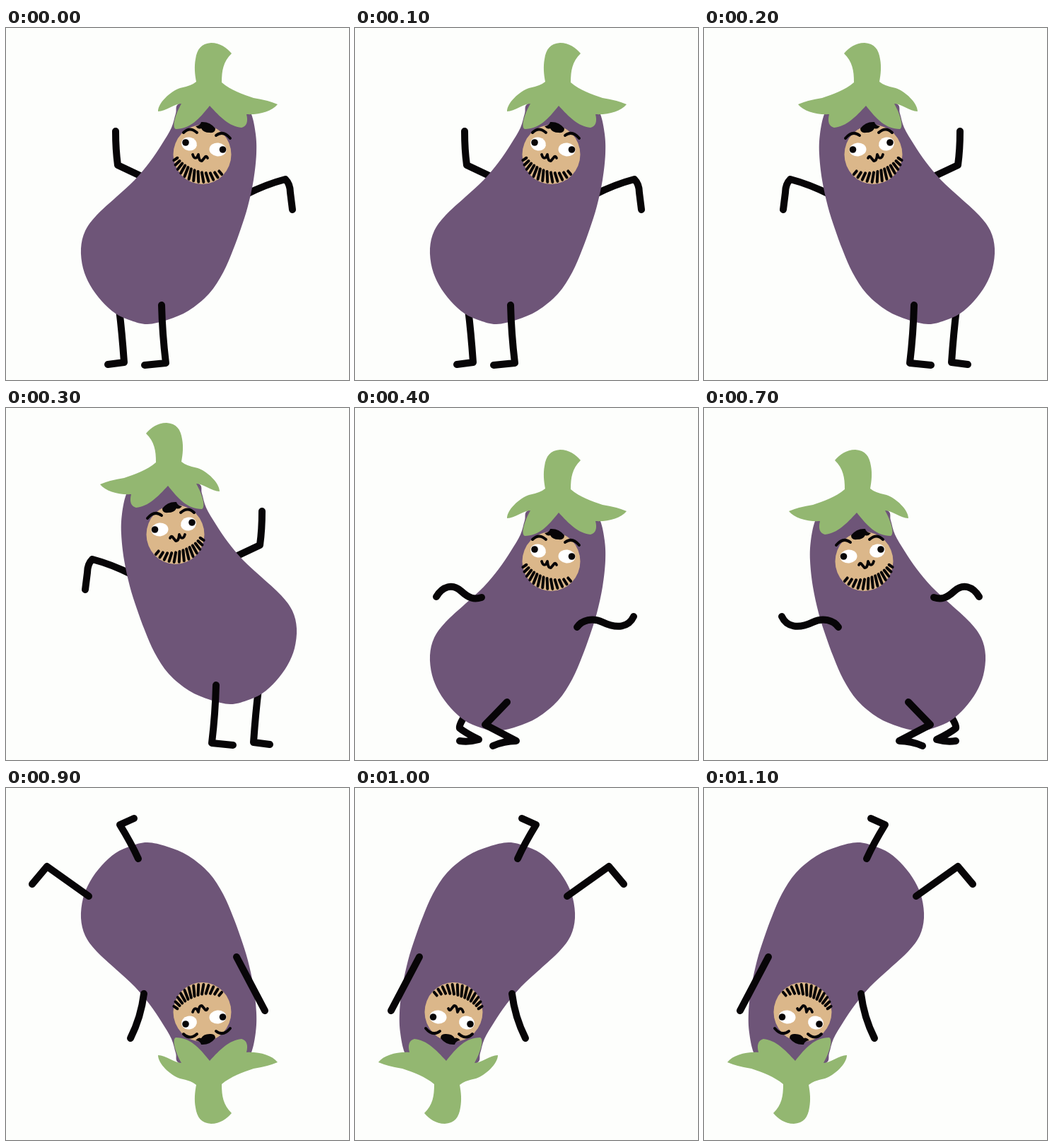
An HTML page with a canvas that plays this animation: 485x498 px, repeating every 1200 ms.

```html
<!DOCTYPE html>
<html lang="en">
<head>
<meta charset="utf-8">
<title>Dancing eggplant</title>
<style>
html, body { margin: 0; width: 100%; height: 100%; overflow: hidden; background: #fdfefc; }
canvas { display: block; }
</style>
</head>
<body>
<canvas id="stage" width="485" height="498"></canvas>
<script>
const ctx = document.getElementById('stage').getContext('2d');
const INK = '#070507', PURPLE = '#6e5578', GREEN = '#93b771', SKIN = '#dbb78a';
const LOOP = 1200, HOLD = 200;

// Smooth closed curve through a few points
function blob(pts) {
  const p = new Path2D(), n = pts.length;
  const at = i => pts[(i + n) % n];
  p.moveTo(...pts[0]);
  for (let i = 0; i < n; i++) {
    const a = at(i - 1), b = at(i), c = at(i + 1), d = at(i + 2);
    p.bezierCurveTo(b[0] + (c[0] - a[0]) / 6, b[1] + (c[1] - a[1]) / 6,
      c[0] - (d[0] - b[0]) / 6, c[1] - (d[1] - b[1]) / 6, c[0], c[1]);
  }
  p.closePath();
  return p;
}

const body = blob([
  [246, 106], [240, 121], [234, 141], [220, 165], [203, 190], [182, 215], [156, 239], [128, 265],
  [112, 287], [106, 312], [109, 340], [119, 364], [135, 386], [155, 404], [177, 414],
  [200, 419], [228, 413], [258, 400], [287, 376], [307, 346], [321, 314], [332, 284],
  [342, 252], [350, 215], [354, 178], [353, 150], [347, 122], [336, 106], [290, 95]
]);

const leaf = new Path2D(
  'M269 76 C267 65 266 55 268 44 C270 30 276 22 290 21 C303 21 312 28 319 36 ' +
  'C307 48 305 60 305 77 C318 88 335 94 350 99 Q370 102 384 108 ' +
  'C376 118 358 123 340 122 Q344 138 333 141 C315 139 303 126 288 110 ' +
  'C273 129 260 143 240 143 C234 140 240 121 248 107 ' +
  'C238 107 226 118 215 118 C215 106 232 90 246 85 Q262 82 269 76 Z');

const hair = new Path2D('M268 139 Q275 138 276 133 Q288 132 296 142 Q296 149 288 148 Q279 148 276 142 Q272 144 268 139 Z');
const brows = new Path2D('M251 148 Q260 139 270 148 M297 152 Q307 144 317 156');
const mouth = new Path2D('M264 179 Q266 186 270 183 L272 179 Q273 189 277 188 L282 182 Q284 181 285 184');

const beard = new Path2D();
for (let i = 0; i < 13; i++) {
  const u = i / 12, a = (168 - 122 * u) * Math.PI / 180;
  const x = 277 + 40.5 * Math.cos(a), y = 179 + 39 * Math.sin(a);
  const dx = 270 - x, dy = 165 - y;
  const k = (6 + 9 * Math.sin(Math.PI * u)) / Math.hypot(dx, dy);
  beard.moveTo(x, y);
  beard.lineTo(x + dx * k, y + dy * k);
}

const stand = {
  sy: 1, dy: 0,
  back: 'M155 146 Q155 172 158 194 L194 211 M338 236 Q368 221 395 214 Q402 221 402 233 L405 257 ' +
    'M160 398 Q164 430 167 473 L144 476',
  front: 'M220 392 Q221 432 226 474 L196 477'
};
const crouch = {
  sy: 1, dy: 38,
  back: 'M155 436 Q146 450 148 453 Q155 459 175 469 Q161 473 148 471',
  front: 'M115 267 C124 252 138 248 150 259 C162 270 169 271 179 268 ' +
    'M314 310 C321 300 336 296 350 303 C371 313 387 310 394 295 ' +
    'M215 416 Q194 438 184 448 L228 471 Q211 471 195 478'
};
const headstand = {
  sy: -1, dy: 496,
  back: '',
  front: 'M195 291 Q191 324 176 354 M326 239 L366 315 ' +
    'M117 153 L58 111 L37 136 M187 100 Q177 78 161 52 L181 43'
};

// Each pose is held facing one way, then reflected: x becomes mirror - x
const poses = [
  { ...stand }, { ...stand, mirror: 517 },
  { ...crouch }, { ...crouch, mirror: 504 },
  { ...headstand }, { ...headstand, mirror: 417 }
];

function fill(path, color) {
  ctx.fillStyle = color;
  ctx.fill(path);
}

function stroke(path, width) {
  ctx.strokeStyle = INK;
  ctx.lineWidth = width;
  ctx.stroke(path);
}

function oval(x, y, rx, ry, color, tilt = 0) {
  ctx.fillStyle = color;
  ctx.beginPath();
  ctx.ellipse(x, y, rx, ry, tilt, 0, Math.PI * 2);
  ctx.fill();
}

function drawEggplant() {
  fill(body, PURPLE);
  oval(277.5, 179, 41, 42, SKIN);
  fill(leaf, GREEN);
  oval(259, 164, 11, 9.5, '#fff', 0.2);
  oval(299.5, 172, 12, 9.5, '#fff', 0.1);
  oval(254, 162, 4.8, 4.8, INK);
  oval(306.5, 172, 4.8, 4.8, INK);
  fill(hair, INK);
  stroke(brows, 4);
  stroke(mouth, 3.8);
  stroke(beard, 4);
}

function draw(t) {
  const pose = poses[Math.floor((t % LOOP) / HOLD)];
  ctx.setTransform(1, 0, 0, 1, 0, 0);
  ctx.fillStyle = '#fdfefc';
  ctx.fillRect(0, 0, 485, 498);
  ctx.lineCap = ctx.lineJoin = 'round';
  if (pose.mirror) ctx.setTransform(-1, 0, 0, 1, pose.mirror, 0);
  stroke(new Path2D(pose.back), 10);
  ctx.save();
  ctx.transform(1, 0, 0, pose.sy, 0, pose.dy);
  drawEggplant();
  ctx.restore();
  stroke(new Path2D(pose.front), 10);
}

const start = performance.now();
function tick() {
  draw(performance.now() - start);
  requestAnimationFrame(tick);
}
tick();
</script>
</body>
</html>
```
